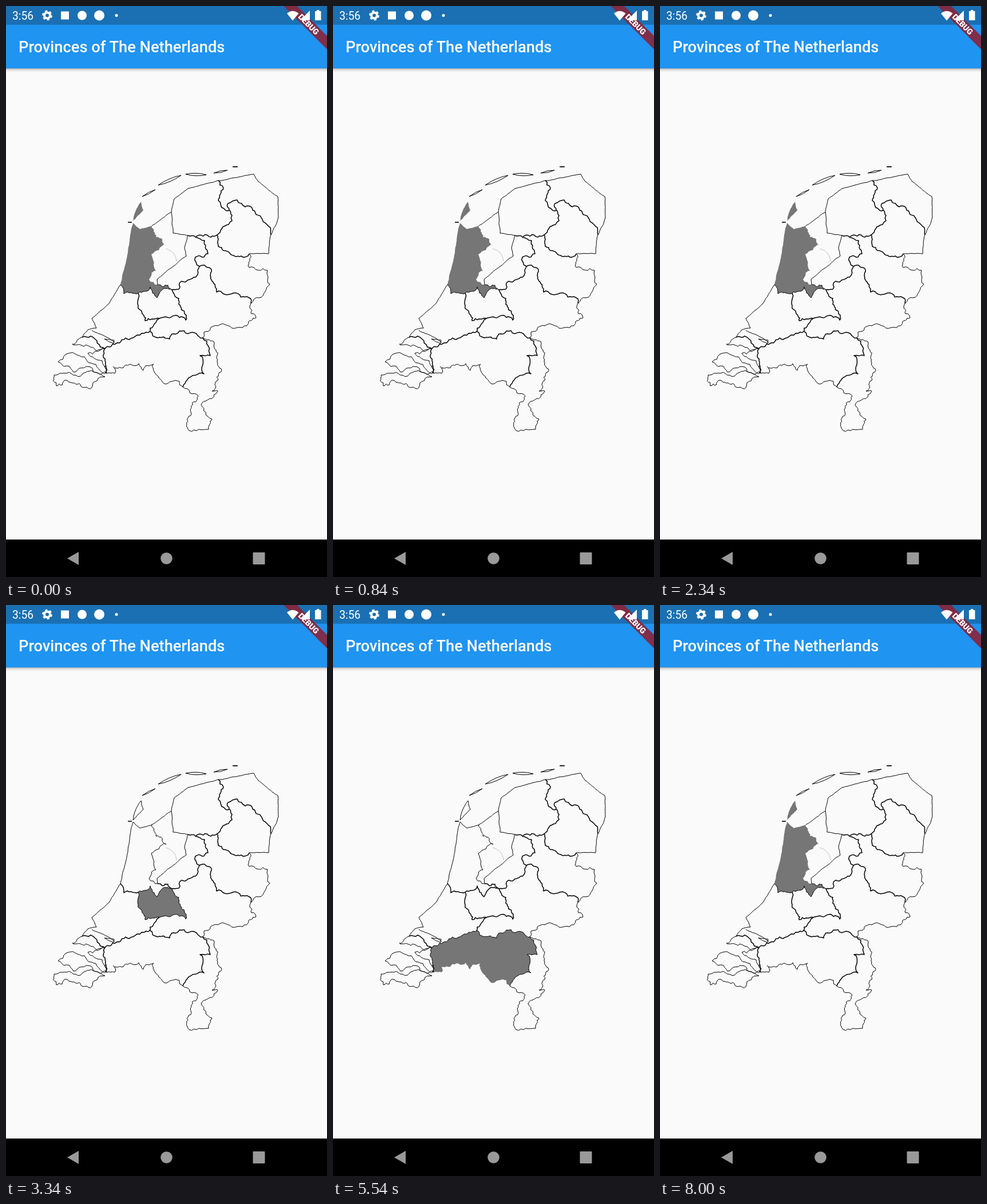
Write an HTML page that moves like this. It is 561 px wide and 998 px high and loops after 8.04 s.

```html
<!DOCTYPE html>
<html lang="en">
<head>
<meta charset="utf-8">
<title>Provinces</title>
<style>
  html, body { margin: 0; width: 100%; height: 100%; overflow: hidden; background: #fafafa; }
  svg { display: block; width: 561px; height: 998px; }
  text { font-family: Roboto, "Liberation Sans", sans-serif; fill: #fff; }
  #lines path { fill: none; stroke: #000; stroke-linejoin: round; }
  #fills path { fill: #767676; display: none; }
</style>
</head>
<body>
<svg viewBox="0 0 561 998">
  <defs>
    <linearGradient id="shade" x2="0" y2="1">
      <stop offset="0" stop-opacity=".3"/>
      <stop offset=".4" stop-opacity=".1"/>
      <stop offset="1" stop-opacity="0"/>
    </linearGradient>
  </defs>
  <rect width="561" height="998" fill="#fafafa"/>
  <g id="fills"></g>
  <g id="lines"></g>

  <rect y="109" width="561" height="7" fill="url(#shade)"/>
  <rect width="561" height="109" fill="#1f94f1"/>
  <rect width="561" height="32.7" fill="#1a70b3"/>
  <text x="22" y="81" font-size="27.27" font-weight="500">Provinces of The Netherlands</text>

  <g transform="translate(561 0) rotate(45)">
    <rect x="-56" y="37" width="112" height="16.5" fill="#8a2439" fill-opacity=".9"/>
    <text y="50.2" font-size="13.9" font-weight="900" text-anchor="middle">DEBUG</text>
  </g>

  <text x="11" y="24" font-size="19.3">3:56</text>
  <g fill="#fff">
    <g fill="none" stroke="#fff">
      <circle cx="72" cy="16.5" r="5" stroke-width="4"/>
      <circle cx="72" cy="16.5" r="7.6" stroke-width="2.6" stroke-dasharray="4 3.96"/>
    </g>
    <rect x="96" y="9.5" width="14" height="14"/>
    <circle cx="133" cy="16.5" r="8"/>
    <circle cx="163" cy="16.5" r="9"/>
    <circle cx="193" cy="16.5" r="2.5"/>
    <path d="M501 25.5 491 13Q501 4.500 511.500 13Z"/>
    <path d="M514 25H531V8Z"/>
    <path d="M540 9H543V7H547.500V9H550.500V25H540Z"/>
  </g>

  <rect y="932.5" width="561" height="65.500"/>
  <g fill="#999">
    <path d="M107 965.500 127 954V977Z"/>
    <circle cx="280.500" cy="965.500" r="10.300"/>
    <rect x="431.500" y="955" width="21" height="21" rx="1"/>
  </g>
</svg>
<script>
const LOOP = 8040;
const schedule = [
  [0, 'northHolland'], [3340, 'utrecht'], [4540, 'brabant'],
  [6290, 'zeeland'], [8000, 'northHolland'],
];

// Junctions where borders meet
const nodes = {
  A: [371, 305], B: [390, 357], C: [463, 400], D: [369, 400], E: [318, 401], F: [425, 433],
  G: [338, 455], H: [428, 520], I: [290, 496], J: [268, 546], K: [251, 569], L: [344, 580],
  M: [309, 666], N: [173, 599], O: [176, 642], P: [200, 487], Q: [231, 502], R: [289, 360],
  S: [255, 384], T: [265, 487], U: [133, 579], V: [331, 404],
};

// Each arc runs through a few key points; the detail between them is generated
const coast = {
  nhCoast: 'P 209,450 217,400 222,379 234,390 S',
  friCoast: 'S R 294,337 318,319 A',
  friWest: 'R 292,397 E',
  groCoast: 'A 433,294 441,307 475,333 476,370 C',
  dreEast: 'C 459,433 F',
  fleCoast: 'E 312,422 315,437 264,478 T',
  zhCoast: 'P 180,520 150,546 158,563 143,566 U',
  maas: '150,567 174,578 190,588',
  voorne: '172,582 188,590 189,584 172,582',
  texel: '236,342 240,357 222,376 225,362 236,342',
};
const ragged = {
  nhEast: 'S 262,404 280,418 254,434 262,463 250,478 T',
  oveEast: 'F 425,457 457,462 461,486 442,510 H',
  gelEast: 'H 426,528 437,545 404,562 370,559 346,570 L',
  limburg: 'L 364,590 376,634 360,673 370,673 341,697 360,722 354,740 320,742 318,720 336,682 M',
  braSouth: 'O 190,642 187,630 232,625 240,637 258,626 262,644 276,660 303,656 M',
  schouwen: 'U 116,591 136,595 160,604 N',
  walcheren: '91,622 104,609 137,613 149,624 176,641 160,641 148,631 118,640 91,622',
  tholen: 'N 143,607 168,620 O',
  flanders: '84,645 98,642 130,647 152,639 173,648 150,667 105,654 88,664 84,645',
};
const shared = {
  friGro: 'A 380,318 371,340 381,354 B',
  groDre: 'B 388,345 404,339 418,351 430,353 448,373 C',
  friDre: 'B 395,366 389,382 D',
  dreOve: 'F 411,437 391,432 371,420 D',
  friOve: 'D 358,404 V E',
  oveFle: 'V 347,410 353,433 331,439 G',
  fleGel: 'G 328,474 307,481 302,495 I',
  oveGel: 'G 359,461 368,500 425,510 H',
  gooi: 'T 283,488 I',
  nhZh: 'P 206,503 Q',
  nhUtr: 'Q 252,491 264,510 280,494 I',
  utrGel: 'I 302,511 314,549 291,542 J',
  utrZh: 'J 243,550 237,533 230,520 Q',
  zhGel: 'K 257,560 J',
  zhBra: 'N 192,590 215,583 245,570 K',
  gelBra: 'K 265,580 286,582 303,568 333,573 L',
  braLim: 'L 357,611 339,611 346,643 317,653 M',
  zeeZh: 'U 148,577 N',
  zeeBra: 'N 173,620 O',
};
// Slim islands, from tip to tip
const islands = ['238,333 261,321', '266,313 306,296', '314,294 350,295', '363,292 387,287', '396,281 405,281', '213,378 220,378'];

// Rings of arcs; a leading minus reverses the arc
const provinces = {
  northHolland: ['nhCoast nhEast gooi -nhUtr -nhZh', 'texel'],
  utrecht: ['nhUtr utrGel utrZh'],
  brabant: ['zhBra gelBra braLim -braSouth -zeeBra'],
  zeeland: ['zeeZh -schouwen', 'walcheren', 'tholen -zeeBra', 'flanders'],
};

let seed = 7;
const random = () => (seed = seed * 16807 % 2147483647) / 2147483647;

// Midpoint displacement from a towards b; b itself is left out
function fractal(a, b, rough) {
  const dx = b[0] - a[0], dy = b[1] - a[1], len = Math.hypot(dx, dy);
  if (len < 5) return [a];
  const k = (random() - .5) * rough * Math.min(len, 14) / len;
  const mid = [a[0] + dx / 2 - dy * k, a[1] + dy / 2 + dx * k];
  return [...fractal(a, mid, rough), ...fractal(mid, b, rough)];
}

const parse = s => s.split(' ').map(p => nodes[p] || p.split(',').map(Number));
const toPath = points => 'M' + points.map(p => p.map(n => n.toFixed(1)).join(' ')).join('L');

function addPath(parent, d, width = 1) {
  const path = document.createElementNS('http://www.w3.org/2000/svg', 'path');
  path.setAttribute('d', d);
  path.style.strokeWidth = width;
  return document.getElementById(parent).appendChild(path);
}

const arcs = {}, lines = {}, fills = {};
function addArcs(group, rough, width) {
  for (const [name, data] of Object.entries(group)) {
    const keys = parse(data);
    arcs[name] = keys.flatMap((p, i) => i < keys.length - 1 ? fractal(p, keys[i + 1], rough) : [p]);
    lines[name] = { path: addPath('lines', toPath(arcs[name]), width), width };
  }
}
addArcs(coast, .12, 1);
addArcs(ragged, .55, 1);
addArcs(shared, .5, 1.5);

for (const island of islands) {
  const [[x1, y1], [x2, y2]] = parse(island);
  const x = (x1 + x2) / 2, y = (y1 + y2) / 2, bulge = (x2 - x1) / 8;
  addPath('lines', `M${x1} ${y1}Q${x} ${y - bulge} ${x2} ${y2}Q${x} ${y + bulge} ${x1} ${y1}`);
}
addPath('lines', 'M279 424Q297 429 298 446', .5).style.stroke = '#888';

const ringPath = ring => toPath(ring.split(' ').flatMap(name =>
  name[0] === '-' ? [...arcs[name.slice(1)]].reverse() : arcs[name])) + 'Z';
for (const [name, rings] of Object.entries(provinces)) {
  fills[name] = addPath('fills', rings.map(ringPath).join(''));
}

// A filled province loses its own outline; its neighbours keep theirs
function select(name) {
  for (const key in fills) fills[key].style.display = key === name ? 'inline' : 'none';
  const own = provinces[name].join(' ').replace(/-/g, '').split(' ');
  for (const key in lines) {
    const { path, width } = lines[key];
    path.style.strokeWidth = own.includes(key) ? (key in shared ? 1 : 0) : width;
  }
}

let current;
const start = performance.now();
function draw(now) {
  const t = Math.max(0, now - start) % LOOP;
  const name = schedule.filter(([at]) => at <= t).pop()[1];
  if (name !== current) select(current = name);
  requestAnimationFrame(draw);
}
draw(start);
</script>
</body>
</html>
```
